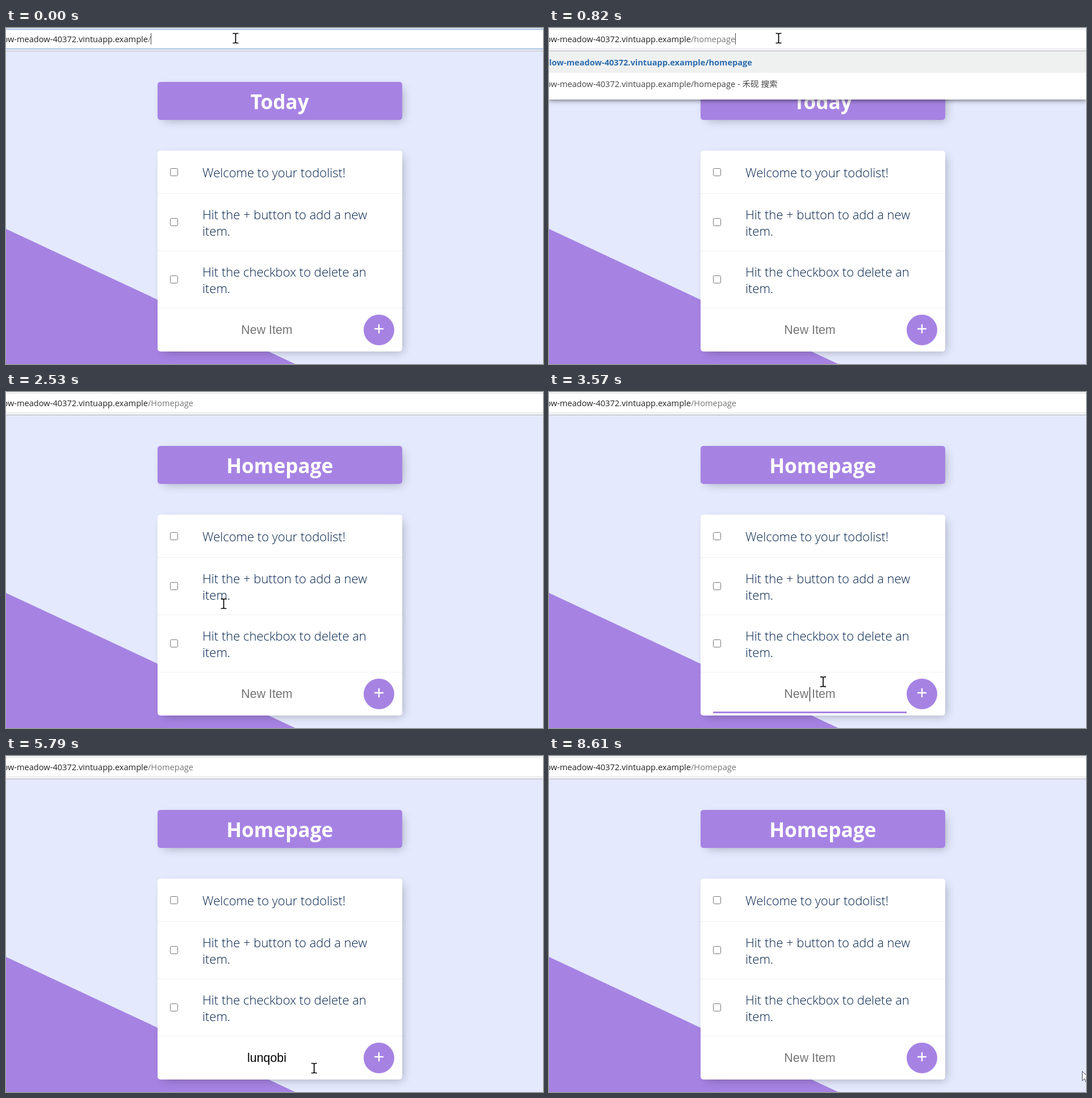
Write an HTML page that moves like this. It is 946 px wide and 592 px high and loops after 8630 ms.

```html
<!DOCTYPE html>
<html lang="en">
<head>
<meta charset="utf-8">
<title>Todo list</title>
<style>
  html, body { margin: 0; width: 100%; height: 100%; overflow: hidden; }
  * { box-sizing: border-box; }
  #stage { position: absolute; left: 0; top: 0; width: 946px; height: 592px; overflow: hidden; background: #e4e9fd; font-family: "Open Sans", "Noto Sans", sans-serif; white-space: nowrap; }
  #stage div, #cursor { position: absolute; }
  #slope { inset: 0; background: #a683e3; clip-path: polygon(0 354px, 509.5px 592px, 0 592px); }

  #chrome { left: 0; top: 0; width: 946px; height: 41px; background: #f4f4f6; border-bottom: 1px solid #b4b4b8; }
  #bar { left: 0; top: 3px; width: 946px; height: 33px; background: #fff; box-shadow: 0 0 0 1px #e6e6ea; }
  #bar.focus { box-shadow: 0 0 0 1.5px #8fb0e2; }
  .address { left: 0; top: 0; width: 946px; height: 38px; line-height: 38px; font-size: 14.6px; color: #767676; }
  .host, .rest { top: 0; }
  .address .host { right: 696px; color: #222; }
  .address .rest { left: 250px; }
  .caret { display: inline-block; width: 1px; background: currentColor; vertical-align: middle; }
  .address .caret { height: 20px; margin-top: -4px; color: #444; }
  #suggest { left: 0; top: 41px; width: 946px; height: 85px; background: #fff; box-shadow: 0 2px 8px rgba(0,0,0,.5); clip-path: inset(0 0 -16px 0); }
  #suggest .address .host, #suggest .address { color: #444; }
  #suggest .second { top: 38px; }
  #suggest .best, #suggest .best .host { color: #2c6cae; font-weight: 700; }
  #suggest .best { background: #eff1f1; }
  #suggest .best .host { right: 670.6px; }
  #suggest .best .rest { left: 275.4px; }

  .panel { left: 267px; width: 430.5px; border-radius: 5px; box-shadow: 5.4px 5.4px 16px -5.4px rgba(0,0,0,.3); }
  #title { top: 95px; height: 67px; line-height: 69px; background: #a683e3; color: #fff; text-align: center; font-size: 35.2px; font-weight: 700; }
  #card { top: 216px; background: #fff; }
  #stage .row { position: relative; height: 101px; border-bottom: 1px solid #f0f0f2; }
  #stage .row.short { height: 76px; }
  #stage #added { height: 77px; }
  .row p { position: absolute; left: 79px; top: 50%; margin: 0; transform: translateY(calc(-50% + .5px)); font-size: 22px; line-height: 29px; font-weight: 300; color: #00204a; }
  .box { left: 22px; top: calc(50% - 7px); width: 14px; height: 14px; border: 1px solid #767676; border-radius: 2.5px; background: #fff; }
  .hover .box { border-color: #8a6464; }
  .checked .box { background: #0075ff; border-color: #0075ff; }
  .checked .box::after { content: ""; position: absolute; left: 3.5px; top: 0; width: 5px; height: 9px; border: solid #fff; border-width: 0 2px 2px 0; transform: rotate(45deg); }
  .checked p { text-decoration: line-through #a683e3; }
  #stage #form { position: relative; height: 76px; }
  #field { left: 22px; top: 4px; width: 341px; height: 68px; text-align: center; font: 21.4px/69px "Liberation Sans", Arial, sans-serif; color: #000; }
  #field.empty { color: #757575; }
  #field.focus { box-shadow: inset 0 -3px #a683e3; }
  #field .caret { height: 25px; margin: -4px -1px 0 0; color: #000; }
  #field.empty .caret { position: absolute; left: 170px; top: 22px; margin: 0; }
  #add { left: 362.5px; top: 11px; width: 54px; height: 54px; border-radius: 50%; background: #a683e3; }
  #add svg { position: absolute; left: 0; top: 0; }
  #cursor { left: 0; top: 0; overflow: visible; }
</style>
</head>
<body>
<div id="stage">
  <div id="slope"></div>
  <div id="title" class="panel"></div>
  <div id="card" class="panel">
    <div class="row short"><div class="box"></div><p>Welcome to your todolist!</p></div>
    <div class="row"><div class="box"></div><p>Hit the + button to add a new<br>item.</p></div>
    <div class="row"><div class="box"></div><p>Hit the checkbox to delete an<br>item.</p></div>
    <div class="row" id="added"><div class="box"></div><p id="addedText"></p></div>
    <div id="form">
      <div id="field"><span id="value"></span><span class="caret" id="fieldCaret"></span></div>
      <div id="add"><svg width="54" height="54"><path d="M19 25h16M27 17v16" stroke="#fff" stroke-width="2.4"/></svg></div>
    </div>
  </div>
  <div id="chrome">
    <div id="bar"></div>
    <div class="address"><div class="host"></div><div class="rest"><span class="path"></span><span class="caret" id="barCaret"></span></div></div>
  </div>
  <div id="suggest">
    <div class="address best"><div class="host"></div><div class="rest"><span class="path"></span></div></div>
    <div class="address second"><div class="host"></div><div class="rest"><span class="path"></span> - 禾砚 搜索</div></div>
  </div>
  <svg id="cursor" width="1" height="1">
    <path id="beam" d="M-5-8.5h3.5L0-7.5 1.5-8.5H5M0-7.5V7.5M-5 8.5h3.5L0 7.5 1.5 8.5H5" fill="none" stroke="#000" stroke-width="1.7"/>
    <path id="arrow" d="M.5.5V17.2L4.5 13.6 7.3 20.3 10 19.2 7.2 12.7H12.7Z" fill="#fff" stroke="#444a5c"/>
  </svg>
</div>
<script>
const LOOP = 8630;
const HOST = 'grellow-meadow-40372.vintuapp.example';
const ITEM = 'lunqobi';
const BEAM = 0, ARROW = 1;
const $ = id => document.getElementById(id);
const each = (selector, text) => document.querySelectorAll(selector).forEach(el => el.textContent = text);
const show = (id, on) => $(id).style.display = on ? '' : 'none';
const clamp = v => Math.max(0, Math.min(1, v));
const within = (t, a, b) => t >= a && t < b;
const typed = (text, times, t) => text.slice(0, times.filter(k => t >= k).length);

// Pointer stops: time, x, y, shape
const stops = [
  [0, 404.5, 18, BEAM], [1280, 404.5, 18, BEAM], [1580, 407, 40, ARROW],
  [1800, 412, 90, BEAM], [1960, 410, 150, ARROW], [2110, 404, 190, ARROW],
  [2280, 395, 250, BEAM], [2530, 383.5, 373, BEAM], [2630, 383.5, 373, BEAM],
  [2800, 372, 445, BEAM], [3050, 395, 513, BEAM], [3250, 440, 530, BEAM],
  [3500, 470, 525, BEAM], [3970, 555.5, 430, BEAM], [4940, 555.5, 430, BEAM],
  [5150, 615, 500, ARROW], [5300, 652, 566, ARROW], [5420, 654, 535, ARROW],
  [5600, 652, 536, ARROW], [5690, 610, 540, BEAM], [5790, 543, 550, BEAM],
  [6660, 350, 540, BEAM], [6760, 338, 536, ARROW], [7060, 305.5, 529, ARROW],
  [7160, 305.5, 529, ARROW], [7360, 293, 530, ARROW], [7660, 291, 529, ARROW],
  [7800, 450, 521, ARROW], [8070, 952, 551, ARROW], [8220, 952, 555, ARROW],
  [8600, 939, 555, ARROW], [LOOP, 939, 555, ARROW]
];
const pathTimes = [280, 460, 520, 580, 640, 700, 760, 820];
const itemTimes = [4140, 4240, 4340, 4440, 4540, 4680, 4800];

function moveCursor(t) {
  const i = stops.findIndex(s => s[0] > t) - 1;
  const [t0, x0, y0, shape] = stops[i], [t1, x1, y1] = stops[i + 1];
  const k = (t - t0) / (t1 - t0);
  $('cursor').style.transform = `translate(${x0 + (x1 - x0) * k}px, ${y0 + (y1 - y0) * k}px)`;
  show('beam', shape === BEAM);
  show('arrow', shape === ARROW);
}

function draw(t) {
  each('.path', '/' + (t < 2110 ? typed('homepage', pathTimes, t) : 'Homepage'));
  $('title').textContent = t < 2210 ? 'Today' : 'Homepage';
  $('bar').classList.toggle('focus', t < 280);
  show('barCaret', t < 920);

  const fade = t < 460 ? .62 * clamp((t - 240) / 120) : 1 - clamp((t - 920) / 180);
  $('suggest').style.opacity = fade;
  show('suggest', fade > 0);

  const value = t < 6760 ? typed(ITEM, itemTimes, t) : '';
  const focused = within(t, 3250, 5450);
  $('value').textContent = value || 'New Item';
  $('field').classList.toggle('empty', !value);
  $('field').classList.toggle('focus', focused);
  show('fieldCaret', focused && (within(t, 4140, 5340) || t % 1000 < 750));

  show('added', within(t, 6760, 8220));
  $('added').classList.toggle('hover', within(t, 7000, 7460));
  $('added').classList.toggle('checked', t >= 7460);
  moveCursor(t);
}

each('.host', HOST);
$('addedText').textContent = ITEM;
const start = performance.now();
function tick() {
  draw((performance.now() - start) % LOOP);
  requestAnimationFrame(tick);
}
tick();
</script>
</body>
</html>
```
